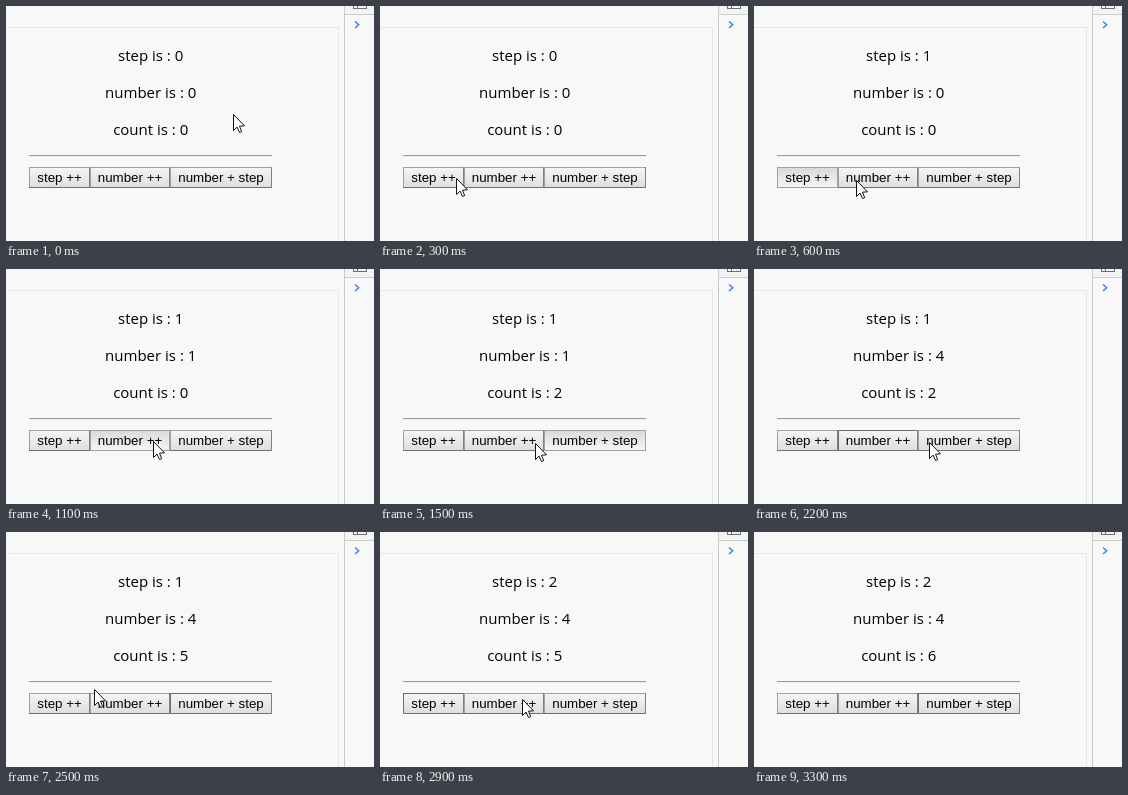
An HTML page with a canvas that plays this animation: 368x235 px, repeating every 3500 ms.

```html
<!DOCTYPE html>
<html lang="en">
<head>
<meta charset="utf-8">
<title>Counter</title>
<style>
  html, body { margin: 0; width: 100%; height: 100%; overflow: hidden; background: #f8f8f8; }
  canvas { display: block; }
</style>
</head>
<body>
<canvas id="stage" width="368" height="235"></canvas>
<script>
const ctx = document.getElementById('stage').getContext('2d');
const TICK = 100, TICKS = 35;

// Cursor tip: [tick, x, y]
const path = [
  [0, 227, 108], [2, 128, 160], [3, 76, 172], [5, 68, 173], [6, 102, 174],
  [8, 110, 174], [9, 110, 174], [10, 143, 172], [11, 147, 172], [13, 206, 173],
  [14, 200, 174], [15, 155, 174], [16, 140, 172], [21, 140, 172], [23, 210, 173],
  [24, 180, 170], [25, 88, 157], [26, 78, 162], [28, 68, 167], [30, 215, 167],
  [31, 255, 141], [32, 366, 47]
];

// Press and release ticks of each click: [down, up, button]
const clicks = [
  [5, 7, 0], [10, 12, 1], [14, 16, 2], [16, 17, 1], [18, 21, 1],
  [21, 22, 1], [24, 25, 2], [27, 29, 0], [30, 31, 2]
];

const buttons = [
  { label: 'step ++', x: 23, w: 61 },
  { label: 'number ++', x: 84, w: 80 },
  { label: 'number + step', x: 164, w: 102 }
];

function rect(x, y, w, h, color) {
  ctx.fillStyle = color;
  ctx.fillRect(x, y, w, h);
}

function stateAt(tick) {
  const s = { step: 0, number: 0, count: 0, pressed: -1, focused: -1 };
  for (const [down, up, button] of clicks) {
    if (tick < down) break;
    if (button === 0) s.step++;
    else if (button === 1) s.number++;
    else s.count = s.number + s.step;
    s.focused = button;
    s.pressed = tick < up ? button : -1;
  }
  return s;
}

function cursorAt(tick) {
  const next = path.findIndex(p => p[0] >= tick);
  if (next < 0) return null;
  const b = path[next], a = path[Math.max(0, next - 1)];
  const k = b[0] === a[0] ? 0 : (tick - a[0]) / (b[0] - a[0]);
  return [1, 2].map(i => Math.round(a[i] + (b[i] - a[i]) * k));
}

function drawPage() {
  rect(0, 0, 368, 235, '#f8f8f8');
  rect(0, 21, 333, 1, '#e6e6e6');
  rect(332, 21, 1, 214, '#e6e6e6');
  rect(338, 0, 1, 235, '#c8c8c8');
  rect(339, 0, 29, 8, '#f3f3f3');
  rect(339, 8, 29, 1, '#cccccc');
  ctx.lineWidth = 1;
  ctx.strokeStyle = '#6e6e6e';
  ctx.strokeRect(347.5, -6.5, 13, 9);
  rect(351, 0, 1, 2, '#6e6e6e');
  ctx.strokeStyle = '#3b82f0';
  ctx.lineWidth = 1.5;
  ctx.beginPath();
  ctx.moveTo(349, 15.5);
  ctx.lineTo(352.7, 18.8);
  ctx.lineTo(349, 22);
  ctx.stroke();
  rect(23, 149, 243, 1, '#9a9a9a');
  rect(23, 150, 243, 1, '#eeeeee');
}

function drawButton({ label, x, w }, pressed, focused) {
  const y = 161, h = 21;
  const fill = ctx.createLinearGradient(0, y, 0, y + h);
  fill.addColorStop(0, pressed ? '#d9d9d9' : '#f6f6f6');
  fill.addColorStop(1, pressed ? '#f6f6f6' : '#dddddd');
  rect(x, y, w, h, focused && !pressed ? '#6c6c6c' : '#a0a0a0');
  if (!pressed) {
    rect(x, y + h - 1, w, 1, '#707070');
    rect(x + w - 1, y, 1, h, '#808080');
  }
  rect(x + 1, y + 1, w - 2, h - 2, fill);
  ctx.fillStyle = '#000';
  ctx.font = '13.333px "Liberation Sans", Arial, sans-serif';
  ctx.textAlign = 'center';
  ctx.fillText(label, x + w / 2, 176);
}

function drawCursor([x, y]) {
  const shape = [[0, 0], [0, 16], [3.6, 12.6], [6, 18], [8.2, 17.2], [6, 11.7], [11, 11.3]];
  ctx.beginPath();
  for (const [dx, dy] of shape) ctx.lineTo(x + dx + 0.5, y + dy + 0.5);
  ctx.closePath();
  ctx.fillStyle = '#fff';
  ctx.fill();
  ctx.lineWidth = 1;
  ctx.strokeStyle = '#111';
  ctx.stroke();
}

function draw(ms) {
  const tick = Math.floor(ms / TICK) % TICKS;
  const state = stateAt(tick);
  drawPage();
  ctx.fillStyle = '#000';
  ctx.font = '15px "Open Sans", "Noto Sans", sans-serif';
  ctx.textAlign = 'center';
  ['step', 'number', 'count'].forEach((name, i) =>
    ctx.fillText(`${name} is : ${state[name]}`, 144.7, 55 + 37 * i));
  buttons.forEach((b, i) => drawButton(b, state.pressed === i, state.focused === i));
  const cursor = cursorAt(tick);
  if (cursor) drawCursor(cursor);
}

const start = performance.now();
function loop() {
  draw(performance.now() - start);
  requestAnimationFrame(loop);
}
loop();
</script>
</body>
</html>
```
